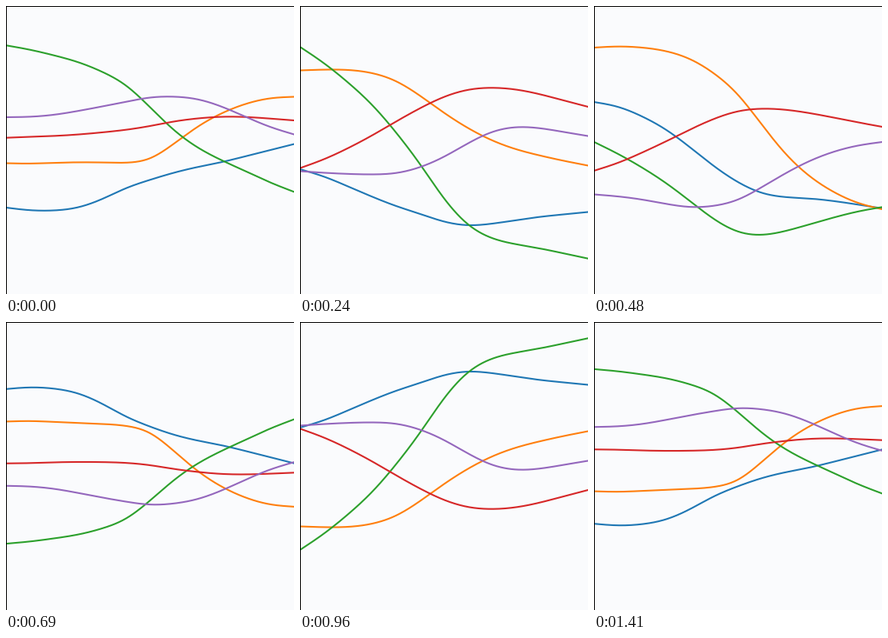
Recreate the animation shown at these times as a matplotlib script. Size 360 by 360 pixels, loop 1440 ms.

```python
import numpy as np
import matplotlib.pyplot as plt
from matplotlib.animation import FuncAnimation
from matplotlib.patches import Rectangle

SIZE = 360
FRAMES = 48
INTERVAL = 30
MID = 168  # height of the zero line, in pixels from the top

KNOTS = np.linspace(0, SIZE, 13)
XS = np.linspace(0, SIZE, 241)

# Per curve: heights for the cosine part and for the sine part
CURVES = {
    "tab:blue": (
        [84, 87.2, 87.5, 83.6, 73.3, 59.8, 49.3, 40.4, 33.2, 27, 19.7, 12.2, 4.6],
        [-6.9, 2, 15.9, 32.9, 52.3, 71.6, 88.6, 99, 101, 99.6, 99, 99.7, 100.7]),
    "tab:orange": (
        [28.5, 28.9, 28, 27.4, 27.6, 27.8, 22.3, 4, -17.3, -34, -45.7, -52.5, -54.5],
        [-117.5, -118.8, -117.8, -112.9, -101.3, -80.5, -52.8, -20.2, 9.8, 32.3,
         48.2, 59.8, 67.8]),
    "tab:green": (
        [-118.8, -113.3, -106.3, -97.8, -85.8, -68.5, -41.5, -13, 9, 25, 38.8,
         52.4, 64.3],
        [-66.4, -45.9, -22.2, 5.2, 38.1, 73.9, 107.5, 128.6, 135.7, 135.4, 133.6,
         132.9, 133.4]),
    "tab:red": (
        [-3.3, -4.5, -5.6, -7.4, -10, -13.3, -18, -23.6, -27.5, -29.5, -29.2,
         -27.3, -25],
        [41.9, 29.7, 14.4, -2.9, -21.4, -38.7, -52.3, -59.3, -60, -56.3, -49.7,
         -41.8, -34.1]),
    "tab:purple": (
        [-29, -29.6, -32.1, -36.8, -42.4, -48.3, -53.5, -54.6, -51.2, -42, -29.3,
         -17, -7.5],
        [61.2, 63.8, 66.9, 70.3, 71.5, 66.4, 54.4, 35.8, 17.6, 5.3, -0.6, -2.3, -2]),
}


def spline(values):
    """Natural cubic spline through the knots, sampled at XS."""
    n = len(KNOTS)
    k, x = KNOTS / SIZE, XS / SIZE
    line = np.column_stack([np.ones(n), k])
    system = np.block([[np.abs(k[:, None] - k) ** 3, line],
                       [line.T, np.zeros((2, 2))]])
    w = np.linalg.solve(system, np.append(values, [0, 0]))
    return np.abs(x[:, None] - k) ** 3 @ w[:n] + w[n] + w[n + 1] * x


fig = plt.figure(figsize=(3.6, 3.6), dpi=100, facecolor="#fafbfd")
ax = fig.add_axes([0, 0, 1, 1])
ax.set_xlim(0, SIZE)
ax.set_ylim(SIZE, 0)
ax.axis("off")

waves = [(spline(a), spline(b)) for a, b in CURVES.values()]
lines = [ax.plot(XS, MID + a, color=color, lw=1.5)[0]
         for color, (a, _) in zip(CURVES, waves)]

# Left and top edge of the plot frame
for w, h in ((1, SIZE), (SIZE, 1)):
    ax.add_patch(Rectangle((0, 0), w, h, fc="black", lw=0, zorder=3,
                           antialiased=False))


def update(frame):
    angle = 2 * np.pi * frame / FRAMES
    for line, (a, b) in zip(lines, waves):
        line.set_ydata(MID + a * np.cos(angle) + b * np.sin(angle))
    return lines


anim = FuncAnimation(fig, update, frames=FRAMES, interval=INTERVAL,
                     repeat=True, repeat_delay=0)
plt.show()
```
